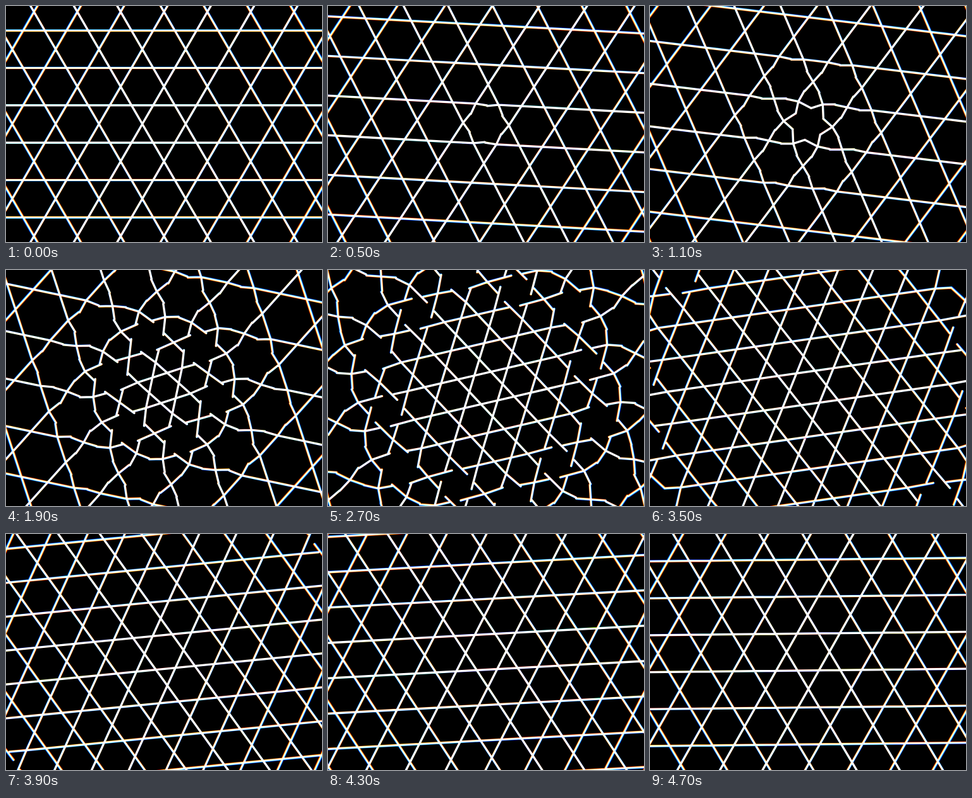
Recreate the animation shown at these times as an HTML page with a canvas. Size 500 px wide and 375 px high, loop 4800 ms.

```html
<!DOCTYPE html>
<html>
<head>
<meta charset="utf-8">
<style>
html, body { margin: 0; width: 100%; height: 100%; overflow: hidden; background: #000; }
canvas { display: block; }
</style>
</head>
<body>
<canvas id="stage" width="500" height="375"></canvas>
<script>
const ctx = document.getElementById('stage').getContext('2d');
const W = 500, H = 375, LOOP = 4800, STEP = 100;
const EDGE = 34.3;              // hexagon side when the loop starts
const REACH = Math.sqrt(3) - 1; // growth that closes each diagonal
const RAD = Math.PI / 180;

const clamp = x => Math.max(0, Math.min(1, x));
const smooth = x => x * x * (3 - 2 * x);

// hexagon centres in side lengths; the fold starts later further out
const cells = [];
for (let i = -5; i <= 5; i++) {
  for (let j = -5; j <= 5; j++) {
    const x = 2 * i + j, y = j * Math.sqrt(3), d = Math.hypot(x, y);
    if (d < 11) cells.push({ x, y, delay: 278 * Math.pow(d, 1.2) });
  }
}

function arm(path, x, y, deg, len) {
  path.moveTo(x, y);
  path.lineTo(x + len * Math.cos(deg * RAD), y + len * Math.sin(deg * RAD));
}

// Each side splits in two arms that fold inwards; one of them
// grows until the pair makes up the short diagonals.
function buildPath(t, a) {
  const path = new Path2D();
  for (const c of cells) {
    const age = t - c.delay;
    const turn = smooth(clamp(age / 1750));
    const fastTurn = 1 - Math.pow(1 - turn, 1.5);
    const grow = Math.pow(clamp((age - 900) / 950), 1.5);
    for (let deg = 0; deg < 360; deg += 60) {
      const x1 = c.x + Math.cos(deg * RAD), y1 = c.y + Math.sin(deg * RAD);
      const x2 = c.x + Math.cos((deg + 60) * RAD), y2 = c.y + Math.sin((deg + 60) * RAD);
      arm(path, x1 * a, y1 * a, deg + 120 + 30 * turn, (0.5 + REACH * grow) * a);
      arm(path, x2 * a, y2 * a, deg - 60 - 30 * fastTurn, 0.5 * a);
    }
  }
  return path;
}

function draw(t) {
  const u = t / LOOP;
  const path = buildPath(t, EDGE * Math.pow(3, u / 2));
  ctx.setTransform(1, 0, 0, 1, 0, 0);
  ctx.globalCompositeOperation = 'source-over';
  ctx.fillStyle = '#000';
  ctx.fillRect(0, 0, W, H);
  ctx.globalCompositeOperation = 'lighter';
  ctx.lineWidth = 3.4;
  ctx.lineCap = 'round';
  // slight colour fringe towards the borders
  [['#f00', 0.9975], ['#0f0', 1], ['#00f', 1.0025]].forEach(([color, zoom]) => {
    ctx.setTransform(zoom, 0, 0, zoom, W / 2, H / 2);
    ctx.rotate(30 * u * RAD);
    ctx.strokeStyle = color;
    ctx.stroke(path);
  });
}

const start = performance.now();
let shown = -1;
function tick() {
  const t = Math.floor(((performance.now() - start) % LOOP) / STEP) * STEP;
  if (t !== shown) draw(shown = t);
  requestAnimationFrame(tick);
}
tick();
</script>
</body>
</html>
```
